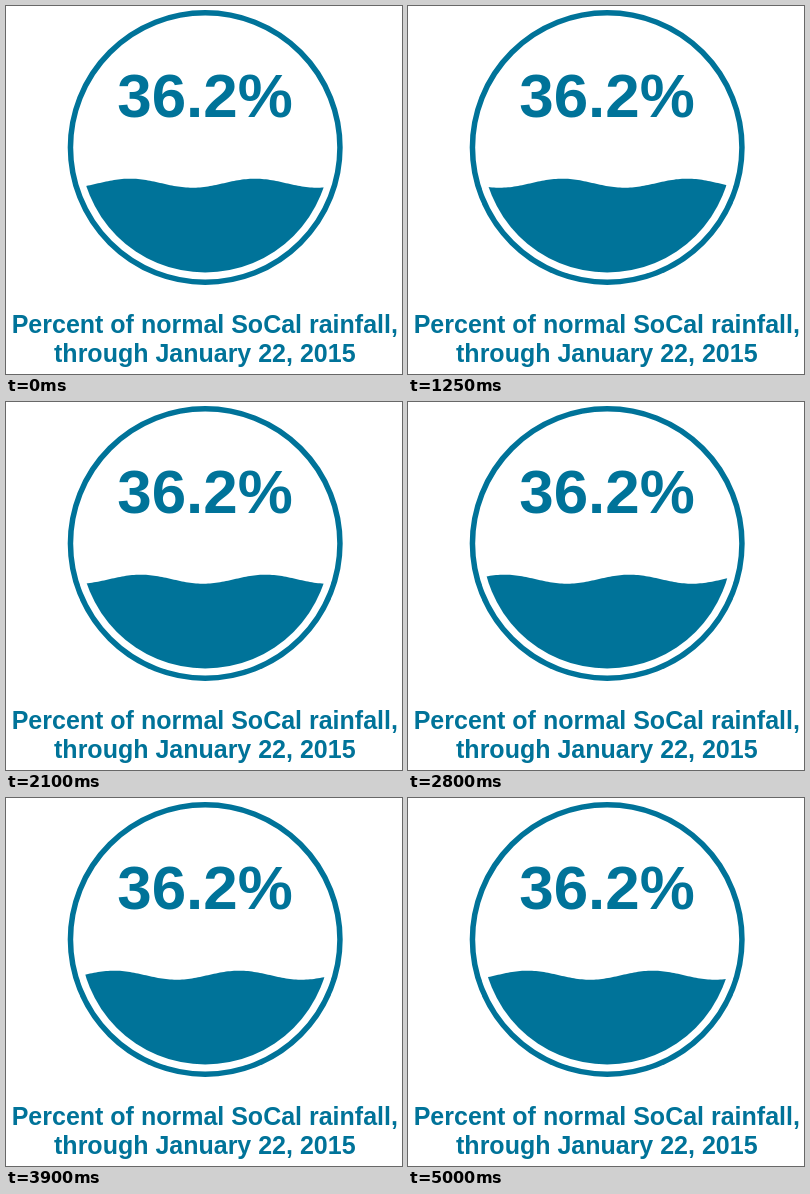
Recreate the animation shown at these times as an HTML page. Size 396 by 368 pixels, loop 5.05 s.

```html
<!DOCTYPE html>
<html lang="en">
<head>
<meta charset="utf-8">
<title>Rainfall gauge</title>
<style>
  html, body { margin: 0; width: 100%; height: 100%; overflow: hidden; background: #fff; }
  svg { display: block; }
  text { font: bold 25px "Liberation Sans", Arial, sans-serif; text-anchor: middle; }
  .value { font-size: 61.9px; }
</style>
</head>
<body>
<svg width="396" height="368" viewBox="0 0 396 368" fill="#007399">
  <clipPath id="water"><path id="wave"/></clipPath>
  <circle cx="199.2" cy="141.5" r="134.75" fill="none" stroke="#007399" stroke-width="5.5"/>
  <circle cx="199.2" cy="141.5" r="125" clip-path="url(#water)"/>
  <text class="value" x="199" y="111.4">36.2%</text>
  <text x="198.8" y="327">Percent of normal SoCal rainfall,</text>
  <text x="198.8" y="356">through January 22, 2015</text>
</svg>
<script>
  const LOOP = 5050, STEP = 50, WAVE_PERIOD = 1007;
  const WAVELENGTH = 125, AMPLITUDE = 4.53, LEVEL = 177.2, FIRST_CREST = 124;
  const wave = document.getElementById('wave');
  const start = performance.now();

  function draw(now) {
    const elapsed = Math.max(0, now - start) % LOOP;
    const time = Math.floor(elapsed / STEP) * STEP;
    const crest = FIRST_CREST + WAVELENGTH * time / WAVE_PERIOD;
    let path = 'M70 280';
    for (let x = 70; x <= 330; x += 2) {
      const y = LEVEL - AMPLITUDE * Math.cos(2 * Math.PI * (x - crest) / WAVELENGTH);
      path += `L${x} ${y.toFixed(2)}`;
    }
    wave.setAttribute('d', path + 'V280Z');
    requestAnimationFrame(draw);
  }
  draw(start);
</script>
</body>
</html>
```
